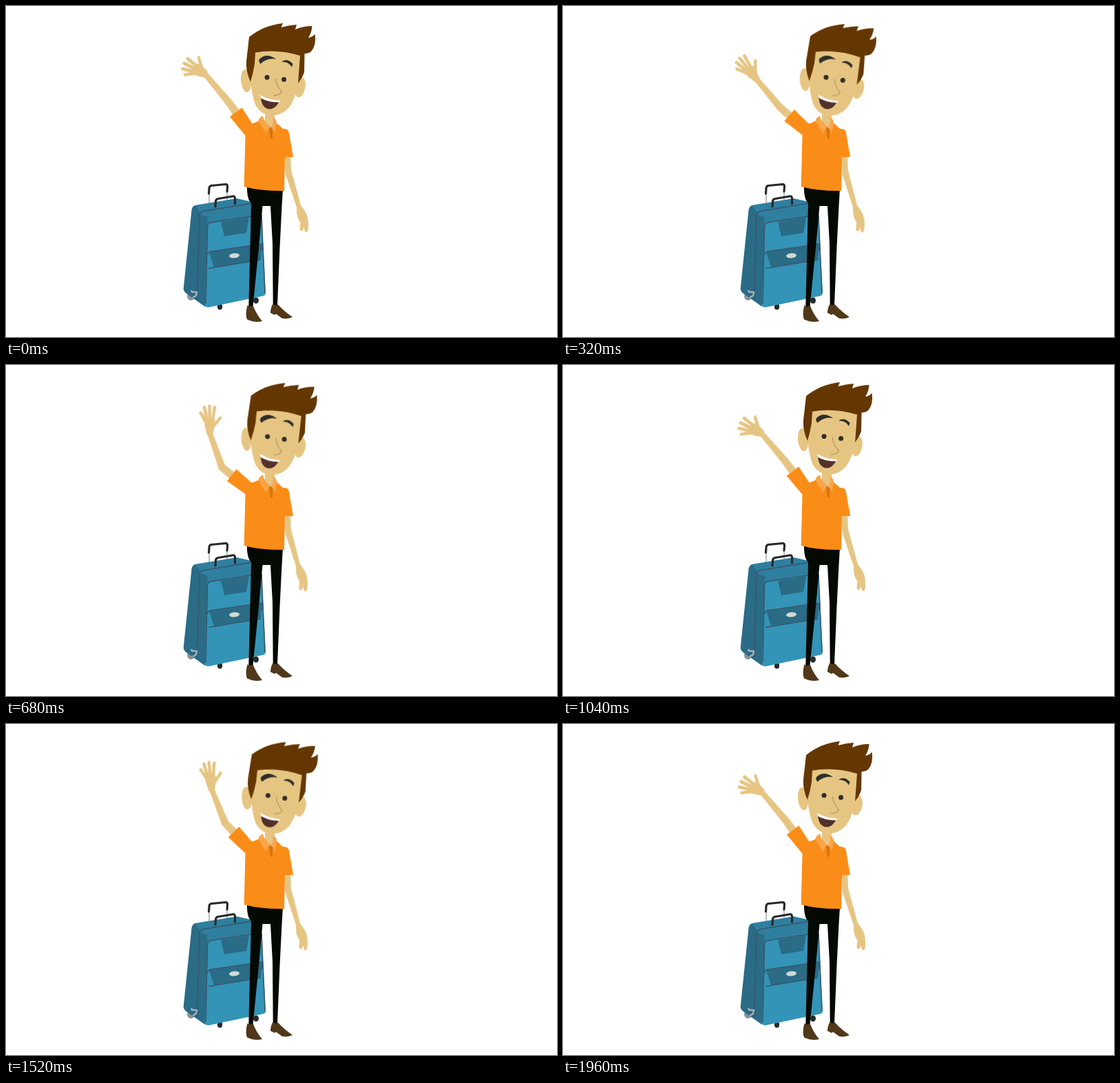
These frames come from a looping animation (800x480 px, 2 s). An HTML page:

```html
<!DOCTYPE html>
<html lang="en">
<head>
<meta charset="utf-8">
<title>Waving traveller</title>
<style>
html, body { margin: 0; width: 100%; height: 100%; overflow: hidden; background: #fff; }
svg { display: block; width: 800px; height: 480px; }

.skin { fill: #e6c583; }
.hair { fill: #653700; }
.shirt { fill: #fa8d17; }
.collar { fill: #fca548; }
.ink { fill: #2f2f29; }
.shoe { fill: #503819; }
.teal { fill: #2a6b86; }
.fingers { stroke: #e6c583; stroke-width: 4.4; stroke-linecap: round; fill: none; }
.seam { stroke: #38566a; stroke-width: 1.5; fill: none; }
.handle { stroke: #29292c; stroke-width: 3.2; stroke-linejoin: round; stroke-linecap: round; fill: none; }

.upper, .fore, .hand, .head, .rest { animation: 1s linear infinite; }
.upper { animation-name: upper; }
.fore { animation-name: fore; }
.hand { animation-name: hand; }
.head { animation-name: head; animation-timing-function: ease-in-out; }
.rest { animation-name: rest; animation-timing-function: ease-in-out; }

@keyframes upper {
  0%, 100% { transform: rotate(54deg); }
  4% { transform: rotate(53.5deg); }
  12% { transform: rotate(48deg); }
  20% { transform: rotate(41deg); }
  28% { transform: rotate(38.5deg); }
  32% { transform: rotate(41deg); }
  48% { transform: rotate(47deg); }
  58% { transform: rotate(45deg); }
  64% { transform: rotate(42.3deg); }
  68% { transform: rotate(38.5deg); }
  78%, 84% { transform: rotate(34deg); }
  88% { transform: rotate(38deg); }
  92% { transform: rotate(49deg); }
  96% { transform: rotate(53.8deg); }
}
@keyframes fore {
  0%, 4%, 96%, 100% { transform: rotate(-4deg); }
  12% { transform: rotate(1deg); }
  20% { transform: rotate(8deg); }
  28% { transform: rotate(11.5deg); }
  32% { transform: rotate(9deg); }
  48% { transform: rotate(20deg); }
  58% { transform: rotate(25deg); }
  64% { transform: rotate(28.4deg); }
  68% { transform: rotate(32deg); }
  78% { transform: rotate(26deg); }
  84% { transform: rotate(18deg); }
  88% { transform: rotate(6deg); }
  92% { transform: rotate(-1deg); }
}
@keyframes hand {
  0%, 4%, 96%, 100% { transform: rotate(-23deg) scale(.88, 1.1); }
  12% { transform: rotate(-12deg) scale(.95, 1.05); }
  20% { transform: rotate(-3deg); }
  28% { transform: rotate(0deg); }
  32% { transform: rotate(1deg); }
  48% { transform: rotate(14deg); }
  58%, 64% { transform: rotate(20deg); }
  68% { transform: rotate(19.5deg); }
  78% { transform: rotate(6deg); }
  84% { transform: rotate(-2deg); }
  88% { transform: rotate(-6deg); }
  92% { transform: rotate(-18deg) scale(.95, 1.05); }
}
@keyframes head {
  0%, 4%, 96%, 100% { transform: translate(0, 0) rotate(0deg); }
  28%, 34% { transform: translate(0, 0) rotate(3deg); }
  64%, 68% { transform: translate(-1.3px, .4px) rotate(2deg); }
}
@keyframes rest {
  0%, 4%, 96%, 100% { transform: rotate(0deg); }
  28%, 68% { transform: rotate(.7deg); }
}
</style>
</head>
<body>
<svg viewBox="0 0 800 480">
  <!-- suitcase -->
  <g>
    <path d="M295 272V289M321 268V284" stroke="#a4a7aa" stroke-width="1.5"/>
    <path class="handle" d="M294.500 272L295 264Q295.500 261 298 260.500L319 258.500Q321.500 258.500 321.500 261.500L321 269"/>
    <ellipse cx="268.500" cy="421" rx="5.500" ry="6" fill="#8b9296"/>
    <ellipse cx="310.500" cy="436" rx="3.600" ry="4.500" fill="#252a2d"/>
    <ellipse cx="363" cy="427" rx="4" ry="4.500" fill="#252a2d"/>
    <path fill="#2f7f9f" d="M271 292Q272 289 277 288.500L335 279L357 284L372 310L293 320L281 301Z"/>
    <path class="teal" d="M275 289.500Q270 290.500 269.500 296L257.700 410Q258 414 262 417L289 436L294 310L282 300Z"/>
    <path fill="#3394b7" d="M293 318Q293.500 314.500 297 314L371 302L377 416Q377 420 373 420.500L294 437Q289 437 288.500 433Z"/>
    <path fill="#2f7f9f" d="M281 301Q283 297 290 297L358 285L371 303L297 314Q293 315 292.500 320L288.500 433L278 426Z"/>
    <path class="teal" d="M281 302L292.500 306L288.500 434L277 426Z"/>
    <path class="seam" d="M277.500 425L281 303Q282 298.500 287 297.500L358 286M290 432L292.500 320Q293 315 297 314L369 303M371 303L376 416"/>
    <path class="teal" d="M312 313L353 306.500L349 329L317 334Z"/>
    <path class="teal" d="M295 357L372 345.500L370 367.500L302 378.500Z"/>
    <path class="seam" d="M292.500 361Q293 357 297 356L372 345V355M294 380.500L370 368"/>
    <ellipse cx="331.500" cy="362" rx="7.500" ry="3.500" fill="#cfd9d3" transform="rotate(-6 331.500 362)"/>
    <path d="M269 412L270 414.500L277 415L276 420L271 423" fill="none" stroke="#a9b0b4" stroke-width="2.400"/>
    <path class="handle" d="M304 291L304.500 283Q305 280 308 279.500L329 276Q332.500 275.500 332.500 279V287"/>
  </g>

  <!-- resting arm -->
  <g transform="translate(409 219)"><g class="rest"><g transform="translate(-409 -219)">
    <path class="skin" d="M404 215H413L414 238L428 289Q436 299 437.500 305Q440 313 438.500 325Q437 330 434 327L432.500 321L430.500 326Q427 327 426.500 323L427.500 314Q421 305 422 292L405.500 243Z"/>
  </g></g></g>

  <!-- legs -->
  <path fill="#050904" d="M350 261L402 265L400.500 290L397.500 350L394 434H387.700L387 345L384 290H372.500L367.500 345L358.500 436H352.300L356 286Q349.500 280 350 261Z"/>
  <path class="shoe" d="M350.500 434Q354 437 358.500 434Q364 448 372 457Q362 460 350 454.500Q347 447 350.500 434Z"/>
  <path class="shoe" d="M387.500 432Q391 435 395 433Q404 443 416 451Q410 454.500 401 453L392 446.500L390 448L384 445Q384 438 387.500 432Z"/>

  <!-- waving arm -->
  <g transform="translate(352 179)"><g class="upper">
    <g transform="translate(-49 0)"><g class="fore">
      <g transform="translate(-53.500 0)"><g class="hand">
        <path class="skin" d="M3 -4Q-8 -8 -18 -8Q-23 0 -18 8Q-8 7.500 3 4Z"/>
        <path class="fingers" d="M-15 5.500L-29 13M-16 3.500L-37 7.500M-17 0H-38.700M-16 -4L-37 -7.500M-8 -4.500L-21.500 -15.500"/>
      </g></g>
      <path class="skin" d="M0 -5.300L-53.500 -3.800Q-57 0 -53.500 3.800L0 5.300Z"/>
    </g></g>
    <circle class="skin" cx="-49" r="5.300"/>
    <path class="skin" d="M-49 -5.300L-25 -6V6L-49 5.300Z"/>
    <path class="shirt" d="M4 -9L-31 -11V11L4 9Z"/>
  </g></g>

  <!-- shirt and neck -->
  <path class="shirt" d="M347.500 188L355 171Q364 169 369 165L392 169L402 178Q410 177 411 184L417 219H405L404 268Q370 268.500 345.700 262Z"/>
  <path class="skin" d="M376 152H390V171L386 180L376 167Z"/>
  <path class="collar" d="M373 159Q367 162 366.500 167L377.500 185L383 174Q374 168 373 159ZM387 161Q393 164 393 170L390.500 185L386 175Q389 169 387 161Z"/>
  <path fill="#d67410" d="M382 178L384.500 175L387 179V193L384 192Z"/>

  <!-- head -->
  <g transform="translate(382 160)"><g class="head"><g transform="translate(-382 -160)">
    <ellipse class="skin" cx="348.500" cy="108.500" rx="7.500" ry="16.500" transform="rotate(-6 348.500 108.500)"/>
    <ellipse class="skin" cx="427" cy="118" rx="7.500" ry="14.500" transform="rotate(12 427 118)"/>
    <path class="skin" d="M360 62L430 66L427 100Q422 132 411 147Q401 159 385 159Q371 158 363 145Q357 132 355 108Z"/>
    <path class="hair" d="M355 110Q348 95 349 80L353 45Q374 28 402 25L399.500 31Q410 28 422 27L420 34Q432 29 444.500 29Q444 38 439 46Q445 45 448.500 40.500Q451 57 443 66Q439 69.500 433.500 69L433 96Q430 105 424 112L427 72Q393 62 362 67.500L361 84Q359 97 355 110Z"/>
    <path class="ink" d="M369.500 84Q366 79 368 77Q378 67 392 77Q379 74.500 369.500 84ZM400 81Q408 75 416.500 84L415 88.500Q410 80 400 81Z"/>
    <circle class="ink" cx="379" cy="103.500" r="3.500"/>
    <circle class="ink" cx="403.500" cy="106.500" r="3.500"/>
    <path d="M391 105Q393 117 400.500 124Q397 130 389 129.500" fill="none" stroke="#b3935c" stroke-width="1.200"/>
    <path fill="#54302a" d="M370 132Q383 139 397 138Q391 150 382 149.500Q371 148 370 132Z"/>
    <path fill="#fff" d="M369 129Q383 137 398.500 137L397 139.500Q382 140 370.500 134Z"/>
  </g></g></g>
</svg>
</body>
</html>
```
